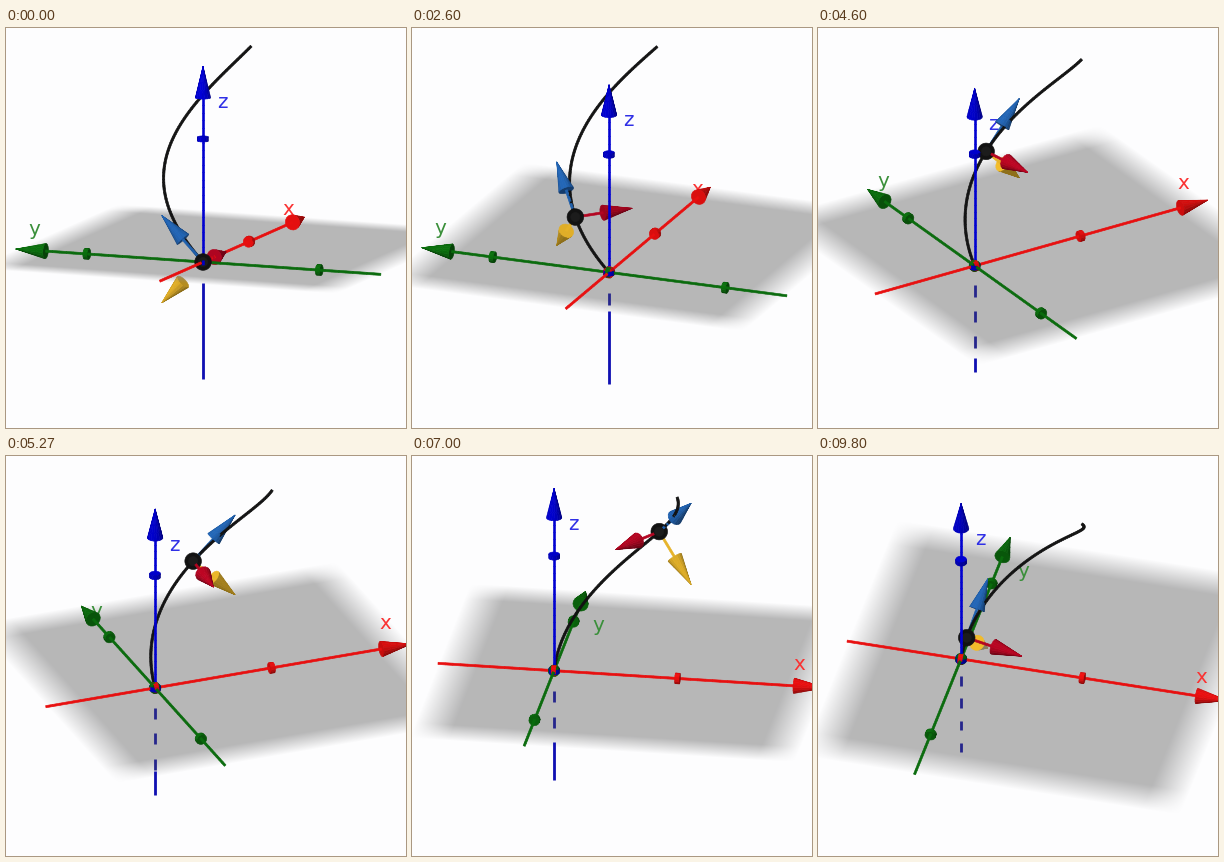
Write a matplotlib script that moves like this. It is 400 by 400 pixels and loops after 9870 ms.

```python
import numpy as np
import matplotlib.pyplot as plt
from matplotlib.animation import FuncAnimation
from matplotlib.collections import LineCollection, PolyCollection
from matplotlib.transforms import Affine2D

SIZE, DPI = 400, 100
STEP, FRAMES = 70, 141
PX = 72 / DPI

# View: pixels per unit, pivot in space and where it lands on the stage
UNIT = 125
PIVOT = np.array([0.643, 0.038, 0.33])
CENTER = np.array([222.2, 180])
LIGHT = np.array([-0.35, 0.45, 0.82])

LOW = np.array([-0.94, -1.53, -0.95])
HIGH = np.array([2.2, 1.61, 1.59])
HEAD, HEAD_R = 0.255, 0.062
BACK = "#fdfdfe"

RED, GREEN, BLUE = (0.91, 0.06, 0.06), (0.04, 0.42, 0.05), (0.0, 0.0, 0.82)
TANGENT, NORMAL, BINORMAL = (0.13, 0.38, 0.68), (0.70, 0.02, 0.13), (0.90, 0.70, 0.16)
BLACK = (0.07, 0.07, 0.07)

# Camera path: times in ms, angles in degrees
TURN = ([0, 2850, 3330, 4070, 4600, 5070, 6000, 7000, 7350],
        [68.4, 68.4, 56.1, 44, 30.9, 24, 11, -9, -14.1])
TILT = ([0, 1000, 1870, 2000, 2400, 3000, 3330, 4070, 4600, 5070,
         6000, 7000, 7100, 7930, 8500, 9000],
        [10.1, 10.3, 13, 14.8, 18.5, 21.5, 22.1, 25.5, 26.8, 26.3,
         24.2, 23.5, 23.7, 36, 38, 38.5])
TRAVEL = ([0, 1870, 3330, 4600, 6000, 7930, 9030],
          [0, 0.272, 0.49, 0.712, 0.92, 1.25, 1.43])
RESTART, SPEED = 9035, 0.000163

# Label offset from an arrow tip, by the arrow's clockwise angle from up
LABEL_ANGLE = [-86, -76, -53, -26, 0, 23, 61, 66, 75, 86]
LABEL_DX = [18, 19, 15, 15, 19, 12.5, -24, -16, -25, -26]
LABEL_DY = [-20, -17, -7, 23, 36, 34, -11, -8, -18, -23]


def helix(t):
    t = np.asarray(t, float)
    return np.stack([(1 - np.cos(2 * t)) / 2, np.sin(2 * t) / 2, t], -1)


def moving_frame(t):
    s, c, r = np.sin(2 * t), np.cos(2 * t), np.sqrt(0.5)
    return (np.array([s, c, 1]) * r, np.array([c, -s, 0]), np.array([s, c, -1]) * r)


def travel(ms):
    if ms > RESTART:
        return (ms - RESTART) * SPEED
    return np.interp(ms, *TRAVEL)


class Scene:
    """Collects shaded polygons and sorts them from back to front."""

    def __init__(self, turn, tilt):
        sa, ca, se, ce = np.sin(turn), np.cos(turn), np.sin(tilt), np.cos(tilt)
        # rows: right, up, towards the viewer
        self.view = np.array([[ca, -sa, 0],
                              [sa * se, ca * se, ce],
                              [-sa * ce, -ca * ce, se]])
        self.above, self.below = [], []

    def project(self, pts):
        v = (np.asarray(pts, float) - PIVOT) @ self.view.T
        return CENTER + UNIT * v[..., :2] * [1, -1], v[..., 2]

    def add(self, depth, poly, color, height=0):
        layer = self.below if height < -0.05 else self.above
        layer.append((depth, poly, color))

    def shade(self, color, normal):
        lit = max(0, normal @ LIGHT)
        return np.clip(np.array(color) * (0.62 + 0.45 * lit), 0, 1)

    def ribbon(self, pts, color, width, keep_hidden=True):
        xy, depth = self.project(pts)
        d = np.diff(xy, axis=0)
        side = np.stack([-d[:, 1], d[:, 0]], 1)
        side *= (width / 2 - 0.3) / (np.hypot(*d.T)[:, None] + 1e-9)
        for i, s in enumerate(side):
            if not keep_hidden and pts[i + 1][2] < -0.02:
                continue
            p, q = xy[i], xy[i + 1]
            self.add((depth[i] + depth[i + 1]) / 2,
                     np.array([p + s, q + s, q - s, p - s]), color)

    def line(self, p, q, color, width, keep_hidden=True):
        n = max(2, int(np.linalg.norm(q - p) / 0.06))
        self.ribbon(p + np.linspace(0, 1, n + 1)[:, None] * (q - p),
                    color, width, keep_hidden)

    def frustum(self, base, axis, r0, r1, length, color, bands=1, sides=16):
        u = np.cross(axis, [0.3, 0.5, 0.81])
        u /= np.linalg.norm(u)
        v = np.cross(axis, u)
        ang = np.linspace(0, 2 * np.pi, sides + 1)[:, None]
        half = ang[:-1] + np.pi / sides
        ring = np.cos(ang) * u + np.sin(ang) * v
        k = np.linspace(0, 1, bands + 1)[:, None, None]
        pts = base + k * length * axis + (r0 + k * (r1 - r0)) * ring
        normals = np.cos(half) * u + np.sin(half) * v + axis * (r0 - r1) / length
        normals = normals / np.linalg.norm(normals, axis=1)[:, None] @ self.view.T
        xy, depth = self.project(pts)
        for j in np.flatnonzero(normals[:, 2] > 0):
            tone = self.shade(color, normals[j])
            for i in range(bands):
                box = np.s_[i:i + 2, j:j + 2]
                quad = xy[box].reshape(4, 2)[[0, 1, 3, 2]]
                self.add(depth[box].mean(), quad, tone, pts[box][..., 2].mean())
        for i, sign in ((0, -1), (-1, 1)):
            n = sign * self.view @ axis
            if n[2] > 0 and (r0, r1)[i] > 0:
                self.add(depth[i].mean(), xy[i], self.shade(color, n),
                         pts[i][:, 2].mean())

    def arrow(self, start, tip, color, width, keep_hidden=True):
        axis = (tip - start) / np.linalg.norm(tip - start)
        base = tip - HEAD * axis
        self.line(start, base, color, width, keep_hidden)
        self.frustum(base, axis, HEAD_R, 0, HEAD, color, bands=4)

    def ball(self, p, radius, color):
        xy, depth = self.project(p)
        ang = np.linspace(0, 2 * np.pi, 40)
        for r, tone in ((radius, color), (radius * 0.55, np.array(color) + 0.04)):
            disc = xy + r * np.stack([np.cos(ang), np.sin(ang)], 1)
            depth += 0.3 * radius / UNIT
            self.add(depth, disc, tone)


def fill(collection, parts):
    parts.sort(key=lambda part: part[0])
    collection.set_verts([part[1] for part in parts])
    colors = [part[2] for part in parts]
    collection.set_facecolor(colors)
    collection.set_edgecolor(colors)


fig = plt.figure(figsize=(SIZE / DPI, SIZE / DPI), dpi=DPI, facecolor=BACK)
ax = fig.add_axes([0, 0, 1, 1])

# Ground plane with edges that fade out
ramp = np.clip(np.minimum(np.linspace(0, 10, 160), np.linspace(10, 0, 160)), 0, 1)
sheet = np.full((160, 160, 4), 0.545)
sheet[..., 3] = 0.61 * np.outer(ramp, ramp)
plane = ax.imshow(sheet, extent=[LOW[0], HIGH[0], LOW[1], HIGH[1]], origin="lower",
                  interpolation="bilinear", aspect="auto", zorder=2)
ax.set_xlim(0, SIZE)
ax.set_ylim(SIZE, 0)
ax.axis("off")

under = PolyCollection([], linewidths=0.6 * PX, zorder=1)
over = PolyCollection([], linewidths=0.6 * PX, zorder=5)
stem = LineCollection([], linewidths=2.8 * PX, capstyle="butt", zorder=3)
for item in (under, over, stem):
    ax.add_collection(item, autolim=False)

labels = [ax.text(0, 0, name, color=color, fontsize=20 * PX, family="DejaVu Sans",
                  ha="center", va="center", zorder=4)
          for name, color in (("x", "#fa3232"), ("y", "#3a8f3a"), ("z", "#3030e6"))]


def draw_stem(scene, turn, tilt):
    """Lower half of the z axis: dashed behind the plane, solid past it."""
    sa, ca = np.sin(turn), np.cos(turn)
    reach = min(-LOW[1] / ca, (-LOW[0] if sa > 0 else HIGH[0]) / max(abs(sa), 1e-6))
    edge = min(0.93 * reach * np.tan(tilt), -LOW[2])
    spans = [(s, min(s + 0.1, -LOW[2])) for s in 0.175 + 0.228 * np.arange(4) if s < edge]
    colors = ["#26268c"] * len(spans)
    if edge < -LOW[2]:
        spans.append((edge, -LOW[2]))
        colors.append("#1010b2")
    stem.set_segments([scene.project([(0, 0, -p), (0, 0, -q)])[0] for p, q in spans])
    stem.set_color(colors)


def draw_axes(scene):
    origin = scene.project(np.zeros(3))[0]
    ticks = ((0, 1), (-1, 0, 1), (0, 1))
    for i, color in enumerate((RED, GREEN, BLUE)):
        axis = np.eye(3)[i]
        start = axis * (LOW[i] if i < 2 else 0)
        tip = axis * HIGH[i]
        scene.arrow(start, tip, color, 2.8)
        for k in ticks[i]:
            scene.frustum(axis * (k - 0.017), axis, 0.043, 0.043, 0.034, color)
        end = scene.project(tip)[0]
        dx, dy = end - origin
        angle = np.degrees(np.arctan2(dx, -dy))
        labels[i].set_position((end[0] + np.interp(angle, LABEL_ANGLE, LABEL_DX),
                                end[1] + np.interp(angle, LABEL_ANGLE, LABEL_DY)))


def draw(i):
    ms = i * STEP
    turn = np.radians(np.interp(ms, *TURN))
    tilt = np.radians(np.interp(ms, *TILT))
    scene = Scene(turn, tilt)

    o, ex, ey = scene.project([(0, 0, 0), (1, 0, 0), (0, 1, 0)])[0]
    ground = Affine2D.from_values(*(ex - o), *(ey - o), *o)
    plane.set_transform(ground + ax.transData)

    draw_stem(scene, turn, tilt)
    draw_axes(scene)
    scene.ribbon(helix(np.linspace(0, 1.59, 71)), BLACK, 3)

    t = travel(ms)
    p = helix(t)
    for d, color in zip(moving_frame(t), (TANGENT, NORMAL, BINORMAL)):
        scene.arrow(p, p + d / 2, color, 2.8, keep_hidden=False)
    scene.ball(p, 8.3, BLACK)

    fill(under, scene.below)
    fill(over, scene.above)
    return [plane, under, over, stem, *labels]


anim = FuncAnimation(fig, draw, frames=FRAMES, interval=STEP, repeat=True,
                     repeat_delay=0, blit=False)
plt.show()
```
